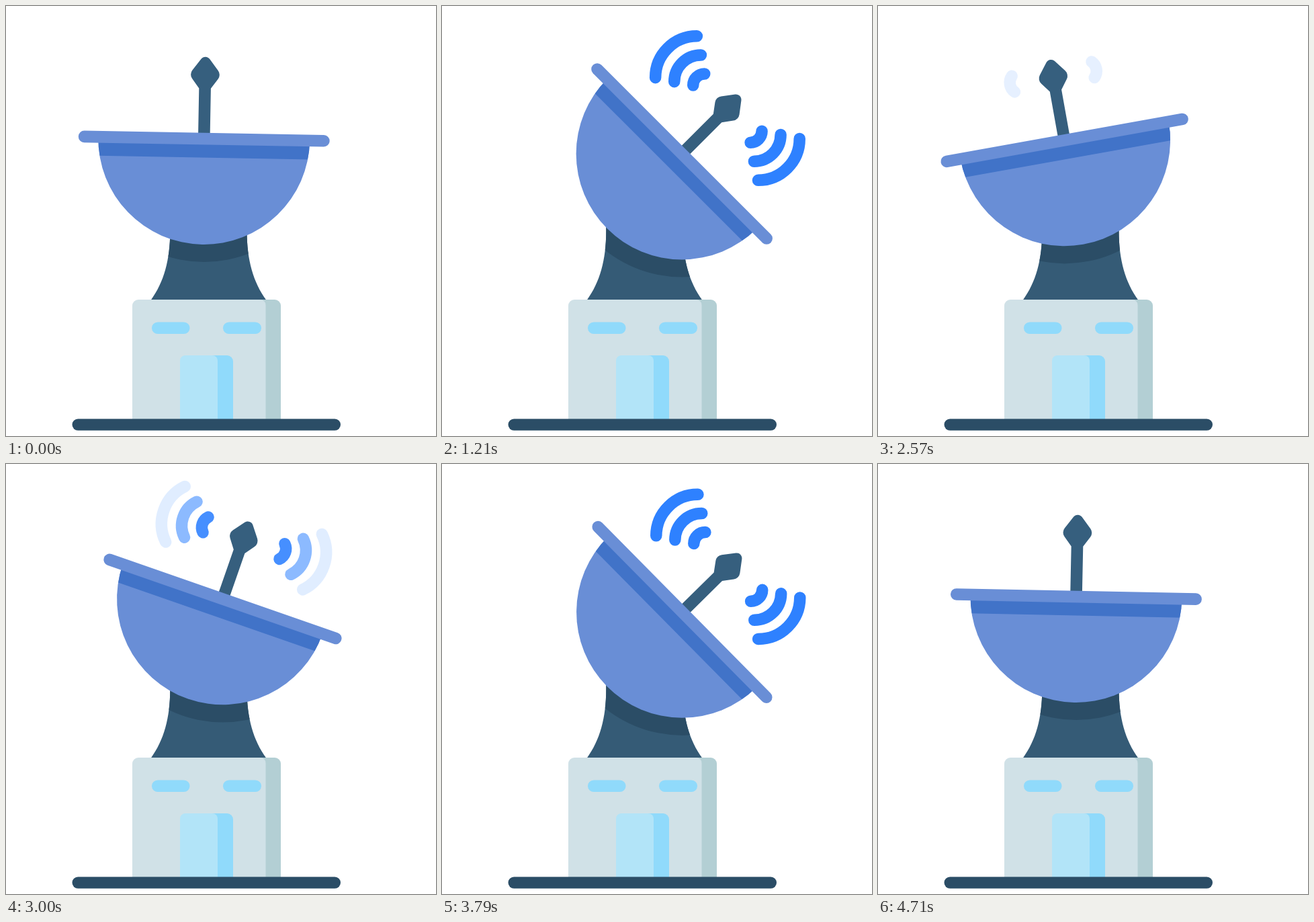
These frames come from a looping animation (640x640 px, 4.78 s). An HTML page with a canvas:

```html
<!DOCTYPE html>
<html lang="en">
<head>
<meta charset="utf-8">
<title>Satellite dish</title>
<style>
  html, body { margin: 0; width: 100%; height: 100%; overflow: hidden; background: #fff; }
  canvas { display: block; width: 640px; height: 640px; }
</style>
</head>
<body>
<canvas id="stage" width="640" height="640"></canvas>
<script>
const ctx = document.getElementById('stage').getContext('2d');

const LOOP = 4780;
const FPS = 14;
const RAD = Math.PI / 180;

// Tilt of the dish: time in ms, angle in degrees.
const TILT = [[0, 1.03], [1178, 45.1], [2385, -14.3], [3577, 49.6], [4745, 1.03]];

const PIVOT = { x: 298.1, y: 286, arm: 88.5, lead: 3.2 };
const BOWL_R = 157.4;
const SHADOW_R = 183.5;
const MAST_Y = -96;

// Arc centre offset, radius and the part of the swing in which it appears.
const WAVES = [
  { x: 48.3, r: 17, from: 0.02, to: 0.65 },
  { x: 55.8, r: 39.7, from: 0.25, to: 0.75 },
  { x: 64.3, r: 61.8, from: 0.42, to: 0.82 }
];

const COLOR = {
  navy: '#2b4d66', neck: '#355b76', mast: '#365f7e',
  bowl: '#698ed6', band: '#4173c8', wave: '#2e81ff',
  wall: '#d0e1e7', wallSide: '#b3cfd4', glass: '#90dafb', door: '#b2e4f8'
};

const clamp01 = v => Math.min(1, Math.max(0, v));
const smooth = v => v * v * (3 - 2 * v);

// The clock advances in steps on a 10 ms grid.
function stepTime(t) {
  const step = Math.floor((Math.floor(t / 10) * 10 + 5) * FPS / 1000);
  return Math.round(step * 100 / FPS) * 10;
}

function poseAt(t) {
  let k = 0;
  while (k < TILT.length - 2 && t >= TILT[k + 1][0]) k++;
  const [t0, a0] = TILT[k];
  const [t1, a1] = TILT[k + 1];
  const u = clamp01((t - t0) / (t1 - t0));
  const angle = a0 + (a1 - a0) * smooth(u);
  const swing = (angle - PIVOT.lead) * RAD;
  return {
    angle: angle * RAD,
    x: PIVOT.x + PIVOT.arm * Math.sin(swing),
    y: PIVOT.y - PIVOT.arm * Math.cos(swing),
    signal: k % 2 ? 1 - u : u
  };
}

function box(x0, y0, x1, y1, radii, color) {
  ctx.fillStyle = color;
  ctx.beginPath();
  ctx.roundRect(x0, y0, x1 - x0, y1 - y0, radii);
  ctx.fill();
}

function drawNeck(dish) {
  ctx.save();
  ctx.beginPath();
  ctx.moveTo(215.5, 438);
  ctx.bezierCurveTo(235, 411, 244.3, 378, 244.3, 335);
  ctx.lineTo(244.3, 290);
  ctx.lineTo(358.5, 290);
  ctx.lineTo(358.5, 335);
  ctx.bezierCurveTo(358.5, 378, 368, 411, 387.5, 438);
  ctx.closePath();
  ctx.fillStyle = COLOR.neck;
  ctx.fill();
  ctx.clip();
  ctx.fillStyle = COLOR.navy;
  ctx.beginPath();
  ctx.arc(dish.x, dish.y, SHADOW_R, 0, 2 * Math.PI);
  ctx.fill();
  ctx.restore();
}

function drawBuilding() {
  box(340, 437, 409, 616, [0, 9, 0, 0], COLOR.wallSide);
  box(188, 437, 386.5, 616, [9, 8, 0, 0], COLOR.wall);
  box(217, 470.5, 273.5, 488, 8.75, COLOR.glass);
  box(323, 470.5, 380, 488, 8.75, COLOR.glass);
  box(290, 520, 338, 616, [0, 9, 0, 0], COLOR.glass);
  box(259, 520, 315, 616, [8, 8, 0, 0], COLOR.door);
  box(98.5, 614.5, 498, 631.7, 8.6, COLOR.navy);
}

function drawMast() {
  ctx.fillStyle = COLOR.mast;
  ctx.beginPath();
  ctx.moveTo(-8.8, 0);
  ctx.lineTo(-8.8, -75);
  ctx.arcTo(-24, -95.5, 0, -127, 10.5);
  ctx.arcTo(0, -127, 24, -95.5, 8);
  ctx.arcTo(24, -95.5, 8.8, -75, 10.5);
  ctx.lineTo(8.8, -75);
  ctx.lineTo(8.8, 0);
  ctx.fill();
}

function drawBowl() {
  ctx.save();
  ctx.beginPath();
  ctx.arc(0, 0, BOWL_R, 0, Math.PI);
  ctx.clip();
  ctx.fillStyle = COLOR.bowl;
  ctx.fillRect(-180, 0, 360, 180);
  ctx.fillStyle = COLOR.band;
  ctx.fillRect(-180, 0, 360, 28);
  ctx.restore();
  box(-187, -8.8, 187, 8.8, 8.8, COLOR.bowl);
}

function drawWaves(signal) {
  ctx.strokeStyle = COLOR.wave;
  ctx.lineWidth = 17.5;
  ctx.lineCap = 'round';
  for (const { x, r, from, to } of WAVES) {
    ctx.globalAlpha = smooth(clamp01((signal - from) / (to - from)));
    for (const side of [0, Math.PI]) {
      ctx.beginPath();
      ctx.arc(x * Math.cos(side), MAST_Y, r, side - Math.PI / 4, side + Math.PI / 4);
      ctx.stroke();
    }
  }
  ctx.globalAlpha = 1;
}

function draw(t) {
  const dish = poseAt(t);
  ctx.fillStyle = '#fff';
  ctx.fillRect(0, 0, 640, 640);
  drawNeck(dish);
  drawBuilding();
  ctx.save();
  ctx.translate(dish.x, dish.y);
  ctx.rotate(dish.angle);
  drawMast();
  drawBowl();
  drawWaves(dish.signal);
  ctx.restore();
}

const start = performance.now();
function tick() {
  draw(stepTime((performance.now() - start) % LOOP));
  requestAnimationFrame(tick);
}
tick();
</script>
</body>
</html>
```
